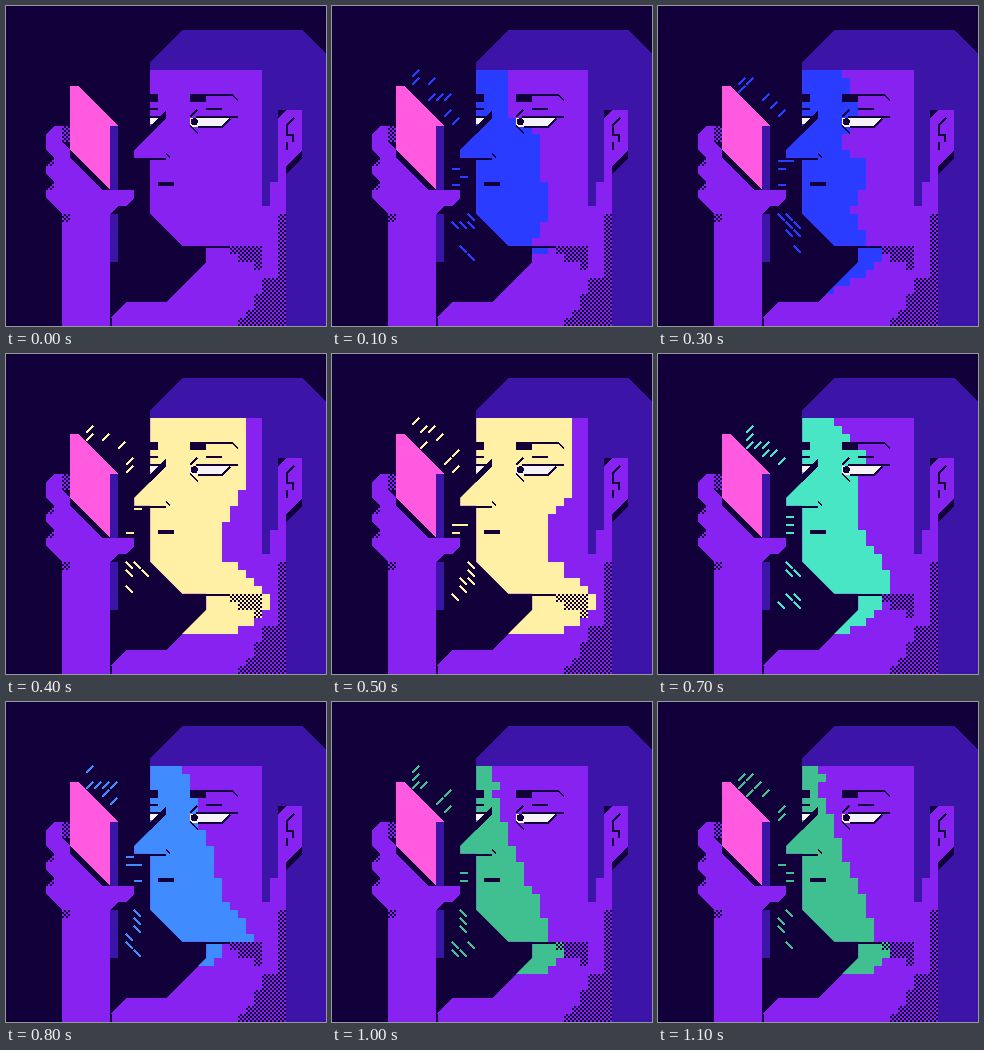
Animation, 320 px wide and 320 px high, one loop 1.2 s. Source, as an HTML page:

```html
<!DOCTYPE html>
<html lang="en">
<head>
<meta charset="utf-8">
<title>Phone glow</title>
<style>
  html, body { margin: 0; width: 100%; height: 100%; overflow: hidden; background: #12003a; }
  svg { display: block; width: 100vw; height: 100vh; shape-rendering: crispEdges; }
  .night { fill: #12003a; }
  .hair { fill: #3c14a8; }
  .skin { fill: #8822f0; }
  .white { fill: #f6f4f8; }
  .line { fill: none; stroke: #12003a; stroke-width: 2; }
</style>
</head>
<body>
<svg viewBox="0 0 320 320">
  <defs>
    <pattern id="checker" width="4" height="4" patternUnits="userSpaceOnUse">
      <path class="night" d="M2 0h2v2h-2zM0 2h2v2h-2z"/>
    </pattern>
    <path id="head" d="M144 64H256V200H264V176H272V104H296V144L280 160V320H104V312L120 296H160L200 256V240H176L144 208V152H128V144L144 128Z"/>
    <clipPath id="headClip"><use href="#head"/></clipPath>
  </defs>

  <rect class="night" width="320" height="320"/>
  <path id="sparks" fill="none" stroke-width="2"/>

  <!-- the small offset settles pixels lying exactly on diagonal edges -->
  <g transform="translate(.25 -.25)">
    <path class="hair" d="M144 56L176 24H296L320 48V321H256V64H144Z"/>
    <use class="skin" href="#head"/>
    <g clip-path="url(#headClip)"><path id="light"/></g>

    <!-- far eye and nose -->
    <path class="white" d="M144 112H152V118H144Z"/>
    <path class="night" d="M144 88H152V96H144ZM160 104V112L144 128V120Z"/>
    <path class="line" d="M144 103H152M144 111H154M128 153H160M160 148L164 152"/>
    <!-- near eye and mouth -->
    <path class="white" d="M184 112H224L216 121H184Z"/>
    <circle class="night" cx="188" cy="116" r="3.5"/>
    <path class="night" d="M184 88H200V96H184ZM152 176H168V180H152Z"/>
    <path class="line" d="M200 89H226L232 95M200 103H216M184 111L191 104M190 111H232M184 120L192 128M192 121H216L224 113"/>
    <!-- ear and jaw -->
    <path class="night" d="M272 104H280L272 112ZM296 144V152L280 168V160Z"/>
    <path class="line" d="M288 112L281 119V129H287V136M281 136V144M176 241H224"/>

    <!-- hand and phone -->
    <path class="hair" d="M104 208H112V256H104Z"/>
    <path class="skin" d="M40 128L48 120H64V144L104 184H128V192L120 200H112L104 208V321H56V208L40 192V184L48 176L40 168V160L48 152L40 144Z"/>
    <path class="night" d="M56 136H64V144L104 184H96L64 152V144ZM104 312H106V321H104Z"/>
    <path class="hair" d="M104 120H112V184H104Z"/>
    <path fill="#ff5ae0" d="M64 80H72L112 120H104V184L64 144Z"/>
  </g>
  <path fill="url(#checker)" d="M224 240H256V264H248V256H232V248H224ZM272 208H280V320H232V312H240V304H248V288H256V272H272ZM56 120H64V136H56ZM40 152H48V160H40ZM40 176H48V184H40ZM56 208H64V216H56Z"/>
</svg>
<script>
const STEP = 100, COUNT = 12, CELL = 8;
const FACE_LEFT = 18, FACE_TOP = 8, FACE_ROWS = 22, NECK_TOP = 30;
const light = document.getElementById('light');
const sparks = document.getElementById('sparks');

// reach: how far the glow spreads, in cells, at even heights from brow to jaw.
// neck, depth: width and height of the glow below the jaw.
const faint = { color: '#2a3cff', reach: [4, 4, 8, 8, 9, 7], neck: 9, depth: 1 };
const blue = { color: '#2a3cff', reach: [5, 7, 5, 9, 6, 8], neck: 10, depth: 6 };
const yellow = { color: '#fff0a6', reach: [12, 12, 12, 9, 9, 14], neck: 15, depth: 5 };
const teal = { color: '#48e6c4', reach: [4, 8, 7, 7, 10, 11], neck: 10, depth: 5 };
const sky = { color: '#408cff', reach: [4, 6, 7, 8, 10, 13], neck: 9, depth: 3 };
const green = { color: '#40bf90', reach: [2, 3, 4, 6, 8, 9], neck: 11, depth: 4 };
const glows = [null, faint, blue, blue, yellow, yellow, teal, teal, sky, sky, green, green];

function randomFrom(seed) {
  let state = seed * 7919 + 1;
  return () => (state = (state * 16807) % 2147483647) / 2147483647;
}

function sample(values, t) {
  const at = t * (values.length - 1);
  const i = Math.min(Math.floor(at), values.length - 2);
  return values[i] + (values[i + 1] - values[i]) * (at - i);
}

const times = (n, make) => Array.from({ length: n }, (_, i) => make(i)).join('');

const glowRow = (row, width) =>
  `M${FACE_LEFT * CELL} ${row * CELL}h${Math.round(width) * CELL}v${CELL}H96v${-CELL}z`;

function glowPath({ reach, neck, depth }, random) {
  const face = times(FACE_ROWS, i =>
    glowRow(FACE_TOP + i, sample(reach, i / (FACE_ROWS - 1)) + (random() - 0.5) * 0.8));
  return face + times(depth, i => glowRow(NECK_TOP + i, neck - i * i / 4));
}

// Rays fan out from the phone: rising above it, level beside it, falling below.
function sparkPath(random) {
  const pick = n => Math.floor(random() * n);
  const dash = (col, row, dy, stroke) => `M${col * CELL} ${row * CELL + dy}${stroke}`;
  const rising = times(9, () => {
    const col = 10 + pick(6);
    return dash(col, Math.round(8 + (col - 10) * 0.7) + pick(3), 7, 'l7 -7');
  });
  const level = times(4, () => dash(15 + pick(2), 19 + pick(4), 3, 'h8'));
  const falling = times(7, () => dash(15 + pick(3), 26 + pick(6), 0, 'l7 7'));
  return rising + level + falling;
}

function render(time) {
  const tick = Math.floor(time / STEP) % COUNT;
  const glow = glows[tick];
  const random = randomFrom(tick + 1);
  light.setAttribute('d', glow ? glowPath(glow, random) : '');
  sparks.setAttribute('d', glow ? sparkPath(random) : '');
  if (!glow) return;
  light.setAttribute('fill', glow.color);
  sparks.setAttribute('stroke', glow.color);
}

const start = performance.now();
function loop() {
  render(performance.now() - start);
  requestAnimationFrame(loop);
}
loop();
</script>
</body>
</html>
```
